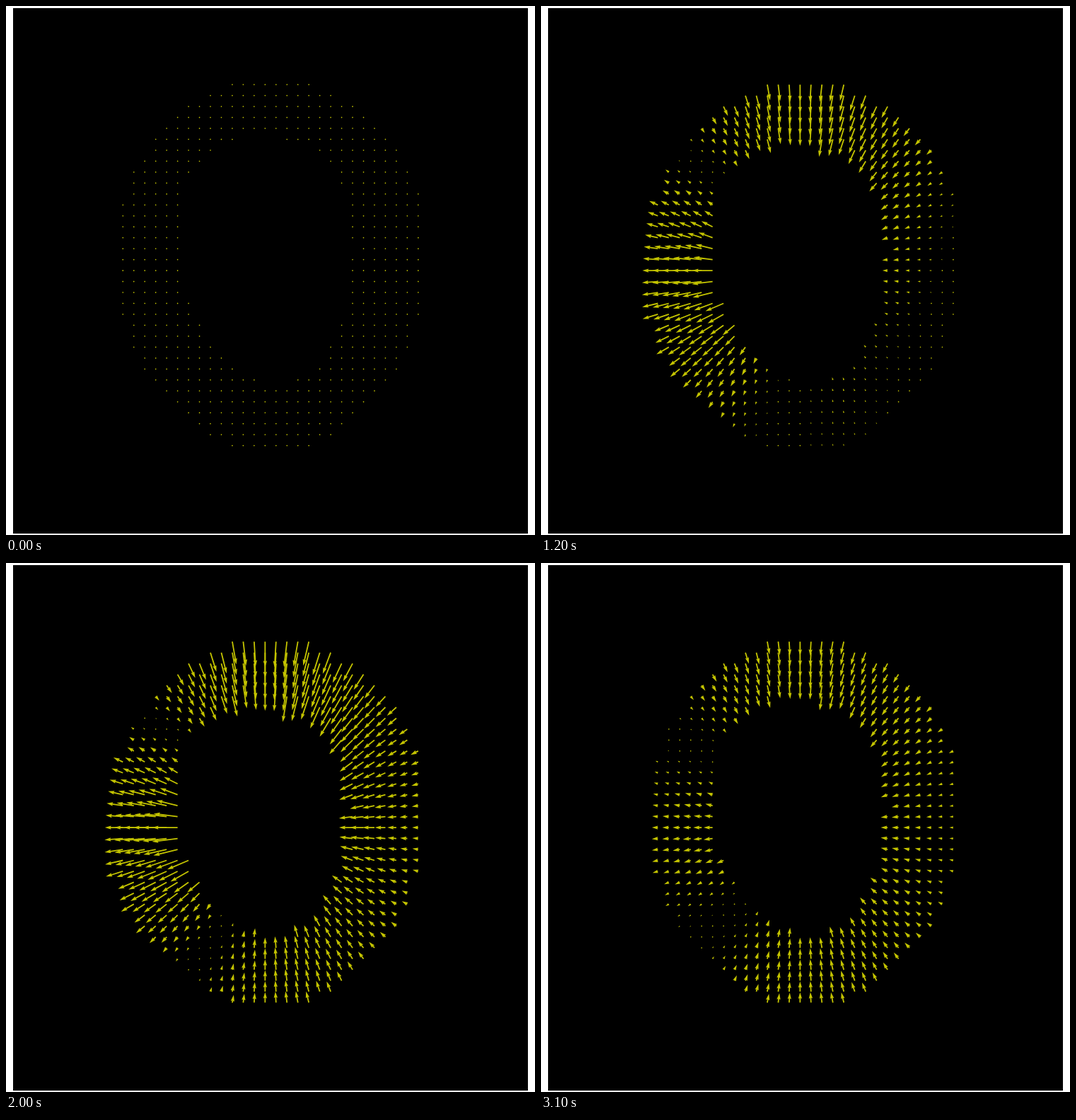
An HTML page with a canvas for the animation above (3200 ms loop, 748x748 px).

```html
<!DOCTYPE html>
<html lang="en">
<head>
<meta charset="utf-8">
<title>Ring displacement field</title>
<style>
  html, body { margin: 0; width: 100%; height: 100%; overflow: hidden; background: #fff; }
  canvas { display: block; }
</style>
</head>
<body>
<canvas id="stage" width="748" height="748"></canvas>
<script>
const ctx = document.getElementById('stage').getContext('2d');
const LOOP = 3200, STEP = 100;
const CELL = 15.465, X0 = 165.3, Y0 = 111.2, COLS = 28, ROWS = 34;
const CENTER = { x: 366.5, y: 374.1 };
const WIDTH = 1.8; // shaft width; the head is 5 widths long and 3 wide

// Egg-shaped walls of the ring, in grid cells
const OUTER = { cx: 13.55, cy: 16.5, a: 14.29, b: 17.1, lean: -0.005, taper: 0.0025, power: 2 };
const INNER = { cx: 13.12, cy: 16, a: 7.85, b: 11.2, lean: 0.045, taper: 0.012, power: 2.2 };

// The motion as four strengths: swelling, sideways and vertical drift, oval squeeze
const KEYS = [
  { t: 0, swell: 0, side: 0, drop: 0, squeeze: 0 },
  { t: 600, swell: 0, side: 2, drop: 9.5, squeeze: 4.5 },
  { t: 1200, swell: 0, side: -16.4, drop: 10.3, squeeze: 12.1 },
  { t: 1700, swell: -4.6, side: -23.5, drop: 8.8, squeeze: 15.8 },
  { t: 2400, swell: -8.7, side: -24, drop: 9.7, squeeze: 17 },
  { t: 3100, swell: -6.9, side: -10.2, drop: 2.4, squeeze: 9.4 }
];

function inEgg({ cx, cy, a, b, lean, taper, power }, col, row) {
  const dy = row - cy;
  const dx = col - cx - lean * dy;
  return Math.abs(dx / (a * (1 - taper * dy))) ** power + Math.abs(dy / b) ** power <= 1;
}

function makePoint(col, row) {
  const x = X0 + col * CELL, y = Y0 + row * CELL;
  const level = Math.hypot((x - 374) / 170, (y - 364) / 217);
  return {
    x, y,
    angle: Math.atan2(y - CENTER.y, x - CENTER.x),
    depth: Math.min(1, Math.max(0, (level - 0.78) / 0.44)) // 0 inner wall, 1 outer wall
  };
}

const points = [];
for (let row = 0; row < ROWS; row++)
  for (let col = 0; col < COLS; col++)
    if (inEgg(OUTER, col, row) && !inEgg(INNER, col, row)) points.push(makePoint(col, row));

// Smooth curve through the keys
function strength(name, t) {
  const last = KEYS.length - 1;
  let i = 0;
  while (i < last - 1 && t >= KEYS[i + 1].t) i++;
  const a = KEYS[i], b = KEYS[i + 1], span = b.t - a.t;
  const slope = k => {
    const p = KEYS[Math.max(k - 1, 0)], n = KEYS[Math.min(k + 1, last)];
    return (n[name] - p[name]) / (n.t - p.t) * span;
  };
  const u = (t - a.t) / span, v = u * u, w = v * u;
  return a[name] * (2 * w - 3 * v + 1) + b[name] * (3 * v - 2 * w) +
    slope(i) * (w - 2 * v + u) + slope(i + 1) * (w - v);
}

// Distance a point moves away from the center
function shiftOf({ angle, depth }, { swell, side, drop, squeeze }) {
  return swell +
    side * (1 - 0.38 * depth) * (Math.cos(angle) + 0.1 * Math.cos(3 * angle)) +
    drop * (Math.sin(angle) - 0.12 * Math.sin(3 * angle)) +
    squeeze * (Math.cos(2 * angle + 0.1) - 0.1 * Math.cos(4 * angle));
}

function polygon(corners) {
  ctx.beginPath();
  corners.forEach(([x, y]) => ctx.lineTo(x, y));
  ctx.closePath();
  ctx.fill();
}

const HEXAGON = Array.from({ length: 6 }, (_, i) =>
  [Math.cos(i * Math.PI / 3) / 2, Math.sin(i * Math.PI / 3) / 2]);

function drawArrow({ x, y, angle }, shift) {
  const length = Math.abs(shift) / WIDTH;
  ctx.save();
  ctx.translate(x, y);
  ctx.rotate(shift < 0 ? angle + Math.PI : angle);
  ctx.scale(WIDTH, WIDTH);
  if (length < 1) {
    polygon(HEXAGON);
  } else {
    const k = Math.min(1, length / 5), tip = Math.max(5, length);
    ctx.scale(k, k);
    polygon([[0, 0.5], [tip - 4.5, 0.5], [tip - 5, 1.5], [tip, 0],
      [tip - 5, -1.5], [tip - 4.5, -0.5], [0, -0.5]]);
  }
  ctx.restore();
}

function draw(t) {
  ctx.fillStyle = '#fff';
  ctx.fillRect(0, 0, 748, 748);
  ctx.fillStyle = '#000';
  ctx.fillRect(10, 3, 728, 743);
  ctx.fillStyle = '#c4c400';
  const pose = {};
  for (const name of ['swell', 'side', 'drop', 'squeeze']) pose[name] = strength(name, t);
  points.forEach(p => drawArrow(p, shiftOf(p, pose)));
}

const start = performance.now();
let shown = -1;
function tick() {
  const t = Math.floor((performance.now() - start) % LOOP / STEP) * STEP;
  if (t !== shown) draw(shown = t);
  requestAnimationFrame(tick);
}
tick();
</script>
</body>
</html>
```
